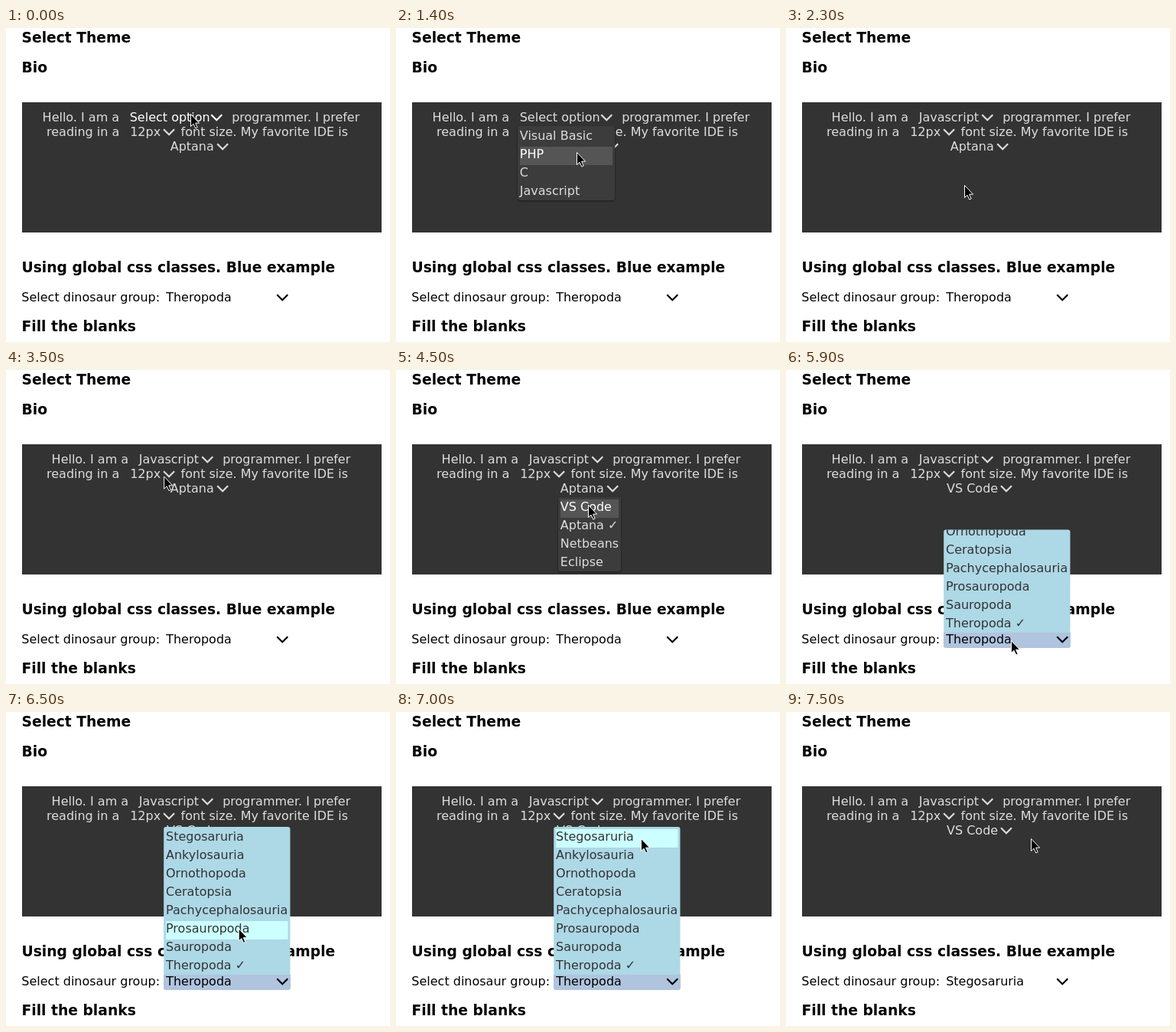
Animation, 502 px wide and 410 px high, one loop 8.6 s. Source, as an HTML page:

```html
<!DOCTYPE html>
<html lang="en">
<head>
<meta charset="utf-8">
<title>Inline selects</title>
<style>
html, body { margin: 0; width: 100%; height: 100%; overflow: hidden; background: #fff; }
#stage { display: block; font: 16px "DejaVu Sans", sans-serif; }
text { white-space: pre; }
.head { font-size: 18.72px; font-weight: bold; }
.shade { filter: drop-shadow(0 1px 1px rgba(0, 0, 0, .5)); }
</style>
</head>
<body>
<svg id="stage" width="502" height="410" viewBox="0 0 502 410"></svg>
<script>
const LOOP = 8600, TICK = 100;
const stage = document.getElementById('stage');
const dark = { bg: '#3c3c3c', hot: '#555', text: '#ddd', hotText: '#fff', shade: 'shade' };
const blue = { bg: '#add8e6', hot: '#cff', text: '#333', hotText: '#333', shade: '' };

// Pointer path: time, x, y
const path = [
  [0, 241, 112], [1200, 241, 112], [1400, 236, 162], [1800, 233, 205],
  [2500, 233, 205], [3000, 195, 134], [3400, 195, 134], [3900, 251, 157],
  [4300, 251, 157], [4500, 251, 176], [4800, 251, 176], [5600, 294, 353],
  [6200, 294, 353], [7000, 320, 165], [LOOP, 320, 165]
];

function pointerAt(t) {
  const i = path.findIndex(k => k[0] > t);
  const [t0, x0, y0] = path[i - 1], [t1, x1, y1] = path[i];
  const p = (t - t0) / (t1 - t0);
  return [x0 + (x1 - x0) * p, y0 + (y1 - y0) * p];
}

const easeOut = p => 1 - (1 - Math.min(1, p)) ** 2;
const within = (t, a, b) => t >= a && t < b;

// Visible share of a list that opens at a and closes at b
function openness(t, a, b, lead = 135) {
  if (t < a) return 0;
  return t < b ? easeOut((t - a + lead) / 300) : 1 - easeOut((t - b + 135) / 300);
}

const text = (x, y, s, fill = '#000', cls = '') =>
  `<text x="${x}" y="${y}" fill="${fill}" class="${cls}">${s}</text>`;

const rect = (x, y, w, h, fill, more = '') =>
  `<rect x="${x}" y="${y}" width="${w}" height="${h}" fill="${fill}" ${more}/>`;

const chevron = (x, y, color) =>
  `<path d="M${x + 1} ${y - 8.8}l7 7 7-7" fill="none" stroke="${color}" stroke-width="2.2"/>`;

function select(x, y, label, arrowX, color = '#ddd') {
  return text(x, y, label, color) + chevron(arrowX, y, color);
}

function list(x, y, w, items, chosen, share, [px, py], look, up) {
  const full = items.length * 24 + 1, h = full * share;
  if (h < 0.5) return '';
  const top = up ? y + full - h : y;
  const inside = px >= x && px < x + w && py >= top && py < top + h;
  const hot = inside ? Math.floor((py - y - 3) / 24) : -1;
  const rows = items.map((item, i) => {
    const on = i === hot, rowY = y - top + i * 24;
    return (on ? rect(3, rowY + 3, w - 6, 24, look.hot) : '') +
      text(2.8, rowY + 18, item + (item === chosen ? ' ✓' : ''), on ? look.hotText : look.text);
  });
  return rect(x, top, w, h, look.bg, `rx="3" class="${look.shade}"`) +
    `<svg x="${x}" y="${top}" width="${w}" height="${h}" overflow="hidden">${rows.join('')}</svg>`;
}

const languages = ['Visual Basic', 'PHP', 'C', 'Javascript'];
const editors = ['VS Code', 'Aptana', 'Netbeans', 'Eclipse'];
const groups = ['Stegosaruria', 'Ankylosauria', 'Ornothopoda', 'Ceratopsia',
  'Pachycephalosauria', 'Prosauropoda', 'Sauropoda', 'Theropoda'];

function draw(t) {
  const pointer = pointerAt(t);
  const hover = (a, b) => within(t, a, b) ? '#fff' : '#ddd';
  const language = t < 2100 ? 'Select option' : 'Javascript';
  const editor = t < 4900 ? 'Aptana' : 'VS Code';
  const group = t < 7300 ? 'Theropoda' : 'Stegosaruria';
  const shift = t < 2100 ? 0 : 12;
  const langArrow = t < 2100 ? 267.3 : 255.3;
  const [edX, edArrow] = t < 4900 ? [214.7, 275.2] : [210, 280];
  const groupOpen = within(t, 5900, 7300);

  stage.innerHTML =
    text(20.5, 19, 'Select Theme', '#000', 'head') +
    text(20.5, 58, 'Bio', '#000', 'head') +
    rect(21, 97, 470, 170, '#333') +
    text(47.6 + shift, 122, 'Hello. I am a', '#ddd') +
    select(161.7 + shift, 122, language, langArrow, hover(0, 1300)) +
    text(295.2 - shift, 122, 'programmer. I prefer', '#ddd') +
    text(53, 141, 'reading in a', '#ddd') +
    select(162.2, 141, '12px', 205.1, hover(3200, 3500)) +
    text(228.6, 141, 'font size. My favorite IDE is', '#ddd') +
    select(edX, 160, editor, edArrow, hover(3900, 4400)) +
    text(20.5, 319, 'Using global css classes. Blue example', '#000', 'head') +
    text(20.3, 357, 'Select dinosaur group:') +
    (groupOpen ? rect(206, 341, 166, 22, '#b0c4de', 'rx="3"') : '') +
    select(209.2, 357, group, 353.3, '#000') +
    text(20.5, 396, 'Fill the blanks', '#000', 'head') +
    list(159 + shift, 128, t < 2100 ? 127 : 103, languages, language,
      openness(t, 800, 2100), pointer, dark) +
    list(edX - 2.7, 166, t < 4900 ? 82 : 92, editors, editor,
      openness(t, 4100, 4900, 170), pointer, dark) +
    list(206.2, 150, 165.3, groups, group,
      openness(t, 5900, 7300), pointer, blue, true) +
    `<path transform="translate(${pointer})" d="M.5 .5V16.5L4 13.2 6.8 19 9.2 17.9 6.6 12.2H11.6Z"
      fill="#000" stroke="#fff" stroke-width="1"/>`;
}

let last = -1;
function frame(now) {
  const t = Math.floor(now % LOOP / TICK) * TICK;
  if (t !== last) draw(last = t);
  requestAnimationFrame(frame);
}
draw(0);
requestAnimationFrame(frame);
</script>
</body>
</html>
```
